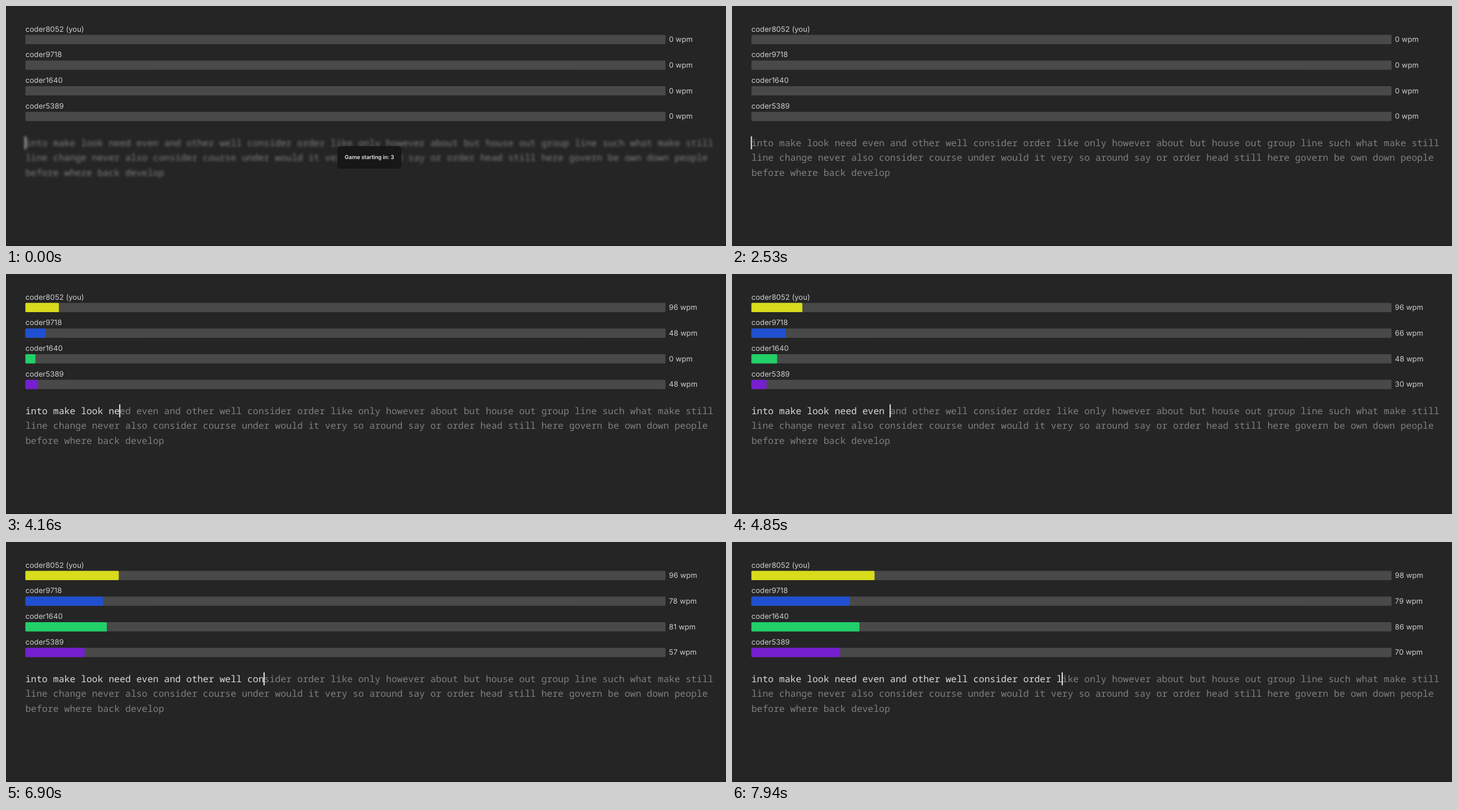
An HTML page for the animation above (8000 ms loop, 1280 by 428 pixels).

```html
<!DOCTYPE html>
<html lang="en">
<head>
<meta charset="utf-8">
<title>Typing race</title>
<style>
  html, body { margin: 0; width: 100%; height: 100%; overflow: hidden; background: #252525; }
  svg { display: block; }
  text { white-space: pre; text-rendering: geometricPrecision; }
  .ui { font: 400 13.14px Inter, sans-serif; fill: #cecece; }
  .words { font: 400 16.447px "Noto Sans Mono", monospace; fill: #7f7f7f; }
  .typed { fill: #dadada; }
  .notice { font: 600 9.85px Inter, sans-serif; letter-spacing: -.012em; fill: #e6e6e6; text-anchor: middle; }
</style>
</head>
<body>
<svg width="1280" height="428" viewBox="0 0 1280 428">
  <rect width="1280" height="428" fill="#252525"/>
  <rect y="426.5" width="1280" height="1.5" fill="#1e1c1e"/>
  <g id="racers"></g>
  <g id="prompt" class="words">
    <text x="34.5" y="250"><tspan id="typed" class="typed"></tspan><tspan id="rest"></tspan></text>
    <text x="34.5" y="276.3">line change never also consider course under would it very so around say or order head still here govern be own down people</text>
    <text x="34.5" y="302.6">before where back develop</text>
    <rect id="caret" y="232.5" width="2" height="23" fill="#eee"/>
  </g>
  <g id="notice">
    <rect x="589" y="250" width="114" height="40" rx="5" fill="#171717"/>
    <text id="count" class="notice" x="646" y="273.3"></text>
  </g>
</svg>
<script>
const LOOP = 8, START = 2.53, LEFT = 34.5, TRACK = 1138, CHAR = 9.868;
const ALL_LETTERS = 225;   // letters in the whole prompt, without spaces
const REPORT_DELAY = 0.07; // seconds before a speed reading shows
const LINE = "into make look need even and other well consider order like only however about but house out group line such what make still";

const $ = id => document.getElementById(id);

// Straight lines through [time, value] points, flat outside them
function through(...points) {
  return t => {
    const i = points.findIndex(([time]) => time > t);
    if (i === 0) return points[0][1];
    if (i < 0) return points.at(-1)[1];
    const [[t0, v0], [t1, v1]] = points.slice(i - 1, i + 1);
    return v0 + (v1 - v0) * (t - t0) / (t1 - t0);
  };
}

// Race time in seconds -> keys pressed, or letters completed
const keys = through([0.063, 0], [3.11, 34.13], [4.38, 43.3], [5.42, 56.1]);
const typedAt = s => LINE.slice(0, Math.floor(keys(s)));
const racers = [
  { name: "coder8052 (you)", color: "#d8dc1d", letters: s => typedAt(s).replaceAll(" ", "").length },
  { name: "coder9718", color: "#2050d0", letters: through([0.36, 0], [1.93, 11], [2.93, 19], [5.43, 36.5]) },
  { name: "coder1640", color: "#22cf68", letters: through([0.93, 0], [2.93, 16], [3.93, 27], [5.43, 40.5]) },
  { name: "coder5389", color: "#751fcf", letters: through([0.78, 0], [0.93, 4], [1.93, 5], [2.93, 7.5], [3.93, 19], [5.43, 34]) }
];

function add(tag, attrs, text = "") {
  const el = document.createElementNS("http://www.w3.org/2000/svg", tag);
  for (const key in attrs) el.setAttribute(key, attrs[key]);
  el.textContent = text;
  return $("racers").appendChild(el);
}

racers.forEach((racer, i) => {
  const y = 51.6 + i * 45.7;
  const box = { x: LEFT, y, height: 16.5, rx: 1.6 };
  add("text", { class: "ui", x: LEFT, y: y - 5.9 }, racer.name);
  add("rect", { ...box, width: TRACK, fill: "#494949" });
  racer.fill = add("rect", { ...box, width: 0, fill: racer.color });
  racer.speed = add("text", { class: "ui", x: 1178.6, y: y + 12.5 });
});

// Bars trail the letters and glide between them
function trailing(letters, s) {
  let sum = 0;
  for (let lag = 17; lag <= 37; lag++) sum += letters(s - lag / 100);
  return sum / 21;
}

function draw(t) {
  const s = t - START + 0.01;
  const second = Math.max(0, Math.floor(s));
  for (const { letters, fill, speed } of racers) {
    const wpm = second && Math.round(12 * letters(second - REPORT_DELAY) / second);
    fill.setAttribute("width", TRACK * trailing(letters, s) / ALL_LETTERS);
    speed.textContent = wpm + " wpm";
  }

  const typed = typedAt(s);
  $("typed").textContent = typed;
  $("rest").textContent = LINE.slice(typed.length);
  $("caret").setAttribute("x", LEFT - 1 + typed.length * CHAR);

  const waiting = t < START;
  const blinkedOff = (t + 0.54) % 1.03 < 0.48;
  $("caret").style.opacity = !typed && blinkedOff ? 0 : 1;
  $("prompt").style.filter = waiting ? "blur(2px)" : "none";
  $("notice").style.display = waiting ? "" : "none";
  $("count").textContent = "Game starting in: " + Math.ceil(START - t);
}

function tick() {
  draw(performance.now() / 1000 % LOOP);
  requestAnimationFrame(tick);
}
tick();
</script>
</body>
</html>
```
